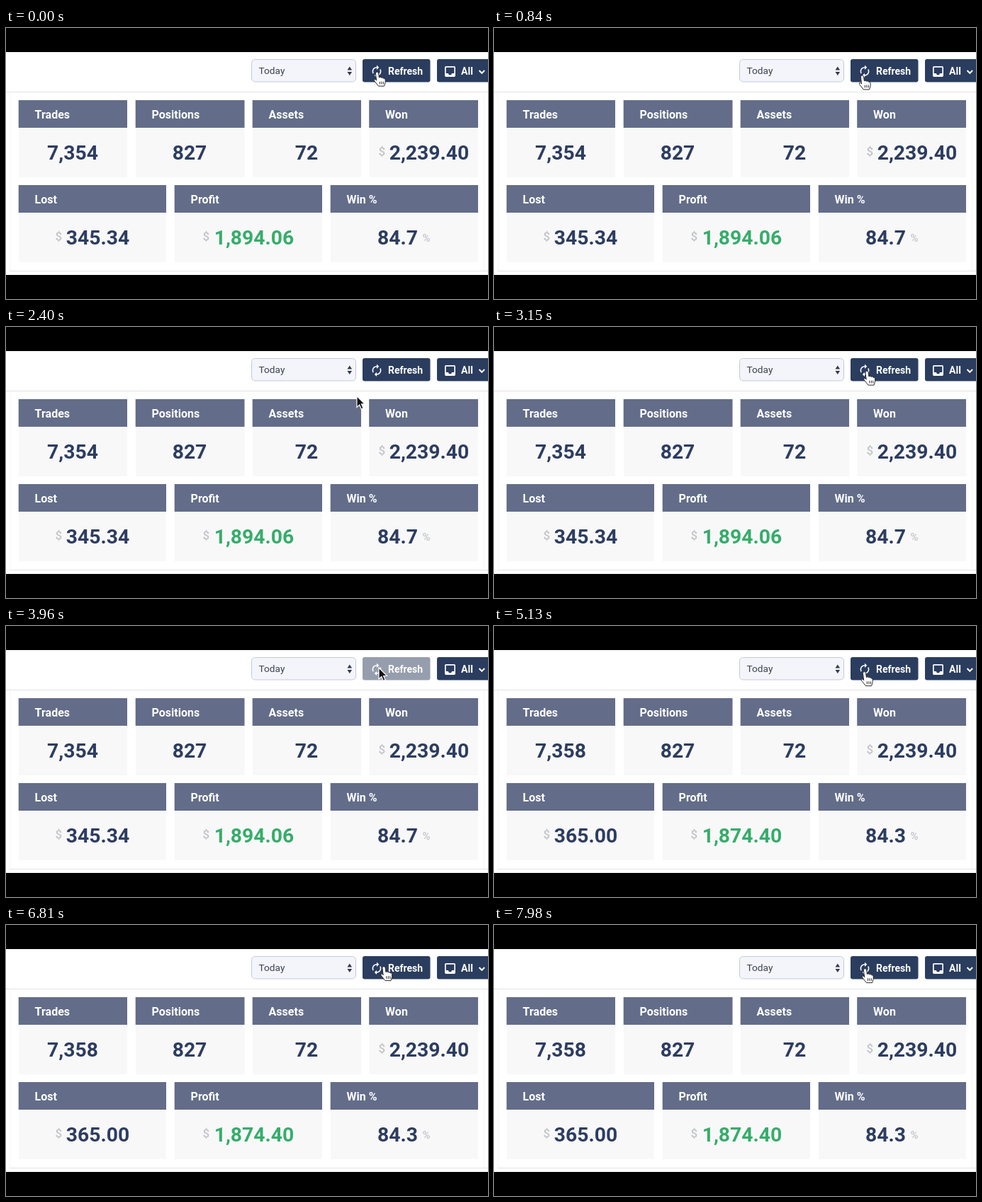
Write an HTML page that moves like this. It is 680x383 px and loops after 8 s.

```html
<!DOCTYPE html>
<html lang="en">
<head>
<meta charset="utf-8">
<title>Trading dashboard</title>
<style>
  html, body { margin: 0; width: 100%; height: 100%; overflow: hidden; background: #000; }
  svg { display: block; width: 100%; height: 100%; }
  text { font-family: Roboto, Arial, sans-serif; }
  .soft { filter: blur(.3px); }
  .label { font-size: 16px; font-weight: 700; fill: #fff; }
  .value { font-size: 28.3px; font-weight: 700; fill: #2d3d60; text-anchor: middle; }
  .unit { font-weight: 500; fill: #c3c4c8; }
  .button { font-size: 14px; font-weight: 700; fill: #fff; }
</style>
</head>
<body>
<svg viewBox="0 0 680 383">
  <rect y="34" width="680" height="315" fill="#fff"/>
  <g class="soft">
    <path d="M0 90.5H680M5 343.5H680" stroke="#e3e4e8"/>
    <path d="M5.5 91V343M674.5 91V343" stroke="#f5f5f7"/>

    <rect x="346.5" y="44.5" width="147" height="31.5" rx="5" fill="#f4f5fa" stroke="#c4c9d9"/>
    <text x="356.5" y="65" font-size="13.7" fill="#3c4254">Today</text>
    <path d="M481.5 59.5l3.3-5 3.3 5zM481.5 62l3.3 5 3.3-5z" fill="#343b4d"/>

    <rect id="refresh" x="503" y="44" width="95.5" height="32.5" rx="3"/>
    <path transform="translate(523 61.3) scale(.8) translate(-12 -12)" fill="#fff"
      d="M12 6v3l4-4-4-4v3c-4.42 0-8 3.58-8 8 0 1.57.46 3.03 1.24 4.26L6.7 14.8c-.45-.83-.7-1.79-.7-2.8 0-3.31 2.69-6 6-6zm6.76 1.74L17.3 9.2c.44.84.7 1.79.7 2.8 0 3.31-2.69 6-6 6v-3l-4 4 4 4v-3c4.42 0 8-3.58 8-8 0-1.57-.46-3.03-1.24-4.26z"/>
    <text class="button" x="539" y="66">Refresh</text>

    <rect x="608" y="44" width="80" height="32.5" rx="3" fill="#2b3d5e"/>
    <path transform="translate(626.5 61.5) scale(.83) translate(-12 -12)" fill="#fff"
      d="M19 3H5a2 2 0 0 0-2 2v14a2 2 0 0 0 2 2h14a2 2 0 0 0 2-2V5a2 2 0 0 0-2-2zm0 12h-4c0 1.66-1.35 3-3 3s-3-1.34-3-3H5V5h14v10z"/>
    <text class="button" x="642" y="66">All</text>
    <path d="M667.5 60l3.8 3.8 3.8-3.8" fill="none" stroke="#fff" stroke-width="2"/>

    <g id="cards"></g>
  </g>

  <g id="cursor">
    <path id="hand" transform="scale(1.06)" fill="#fff" stroke="#222" stroke-width=".9" stroke-linejoin="round"
      d="M-2 1.5Q-1.8-.4 0-.4T2 1.5L2.7 7Q4.8 5.7 5.8 7.4 7.6 6.5 8.5 8.2 10.7 7.6 11 10L11 13.5 9.5 18.5H1.8L-3.7 11.5Q-4.6 9.3-2.5 9.3L-.8 11ZM3.6 12.5v3.5M6 12.5v3.5M8.3 12.5v3.5"/>
    <path id="arrow" fill="#111" stroke="#fff" stroke-width="1.2"
      d="M0 0V16L3.8 12.5 6.3 18.5 9.1 17.3 6.6 11.5H11.5Z"/>
    <g id="beam" fill="none">
      <path id="stem" d="M-4-8.5Q-1-8.5 0-6.5 1-8.5 4-8.5M-4 8.5Q-1 8.5 0 6.5 1 8.5 4 8.5M0-6.5V6.5M-2 3H2"
        style="stroke-width: var(--w, 2.6px); stroke: var(--c, #d9dbe1)"/>
      <use href="#stem" style="--w: 1.2px; --c: #30343f"/>
    </g>
  </g>
</svg>
<script>
const LOOP = 8000, CLICK = 3560, LOADED = 4480;
const byId = id => document.getElementById(id);

// Values hold [before, after] the refresh; cx is the centre of the number.
const cards = [
  { x: 18, y: 102, w: 153, label: 'Trades', cx: 94, values: ['7,354', '7,358'] },
  { x: 183, y: 102, w: 153.5, label: 'Positions', cx: 259, values: ['827', '827'] },
  { x: 348, y: 102, w: 153, label: 'Assets', cx: 424, values: ['72', '72'] },
  { x: 512.5, y: 102, w: 153.5, label: 'Won', cx: 597, values: ['2,239.40', '2,239.40'], unit: '$', unitX: 525.5 },
  { x: 18, y: 222, w: 208, label: 'Lost', cx: 129.5, values: ['345.34', '365.00'], unit: '$', unitX: 69.5 },
  { x: 238, y: 222, w: 208, label: 'Profit', cx: 350, values: ['1,894.06', '1,874.40'], unit: '$', unitX: 277.5, color: '#36ad6a' },
  { x: 458, y: 222, w: 208, label: 'Win %', cx: 552.5, values: ['84.7', '84.3'], unit: '%', unitX: 587.5 }
];

function unitText({ unit, unitX, y }) {
  if (!unit) return '';
  const [size, drop] = unit === '$' ? [17, 78] : [15, 80];
  return `<text class="unit" x="${unitX}" y="${y + drop}" font-size="${size}">${unit}</text>`;
}

byId('cards').innerHTML = cards.map(c => `
  <rect x="${c.x}" y="${c.y + 38}" width="${c.w}" height="71" fill="#f8f8f9"/>
  <rect x="${c.x - .3}" y="${c.y}" width="${c.w + .3}" height="39" fill="#636d89"/>
  <text class="label" x="${c.x + 22.6}" y="${c.y + 26}">${c.label}</text>
  ${unitText(c)}
  <text class="value" x="${c.cx}" y="${c.y + 84}" ${c.color ? `style="fill:${c.color}"` : ''}></text>`).join('');
const valueTexts = document.querySelectorAll('.value');

// Cursor hot spot: time, x, y
const path = [
  [0, 523.5, 62.5], [700, 523.5, 62.5], [1350, 490, 103], [2250, 490, 103],
  [2900, 526, 62.5], [3150, 526, 62.5], [3700, 526, 59], [4500, 526, 59],
  [5130, 522.5, 65], [5900, 523, 65], [6700, 533, 59], [6950, 533, 59],
  [7600, 523.5, 62], [LOOP, 523.5, 62]
];

function cursorAt(t) {
  const i = path.findIndex(p => p[0] > t);
  const [t0, x0, y0] = path[i - 1], [t1, x1, y1] = path[i];
  const u = (t - t0) / (t1 - t0), k = u * u * (3 - 2 * u);
  return [x0 + (x1 - x0) * k, y0 + (y1 - y0) * k];
}

function draw(t) {
  const loading = t >= CLICK && t < LOADED;
  const [x, y] = cursorAt(t);
  const shape = y > 98 ? 'beam' : loading || y > 76 ? 'arrow' : 'hand';

  byId('refresh').setAttribute('fill', loading ? '#969eae' : '#2b3d5e');
  cards.forEach((c, i) => valueTexts[i].textContent = c.values[t < LOADED ? 0 : 1]);
  byId('cursor').setAttribute('transform', `translate(${x} ${y})`);
  for (const id of ['hand', 'arrow', 'beam'])
    byId(id).style.display = id === shape ? '' : 'none';
}

const start = performance.now();
function tick() {
  draw((performance.now() - start) % LOOP);
  requestAnimationFrame(tick);
}
tick();
</script>
</body>
</html>
```
